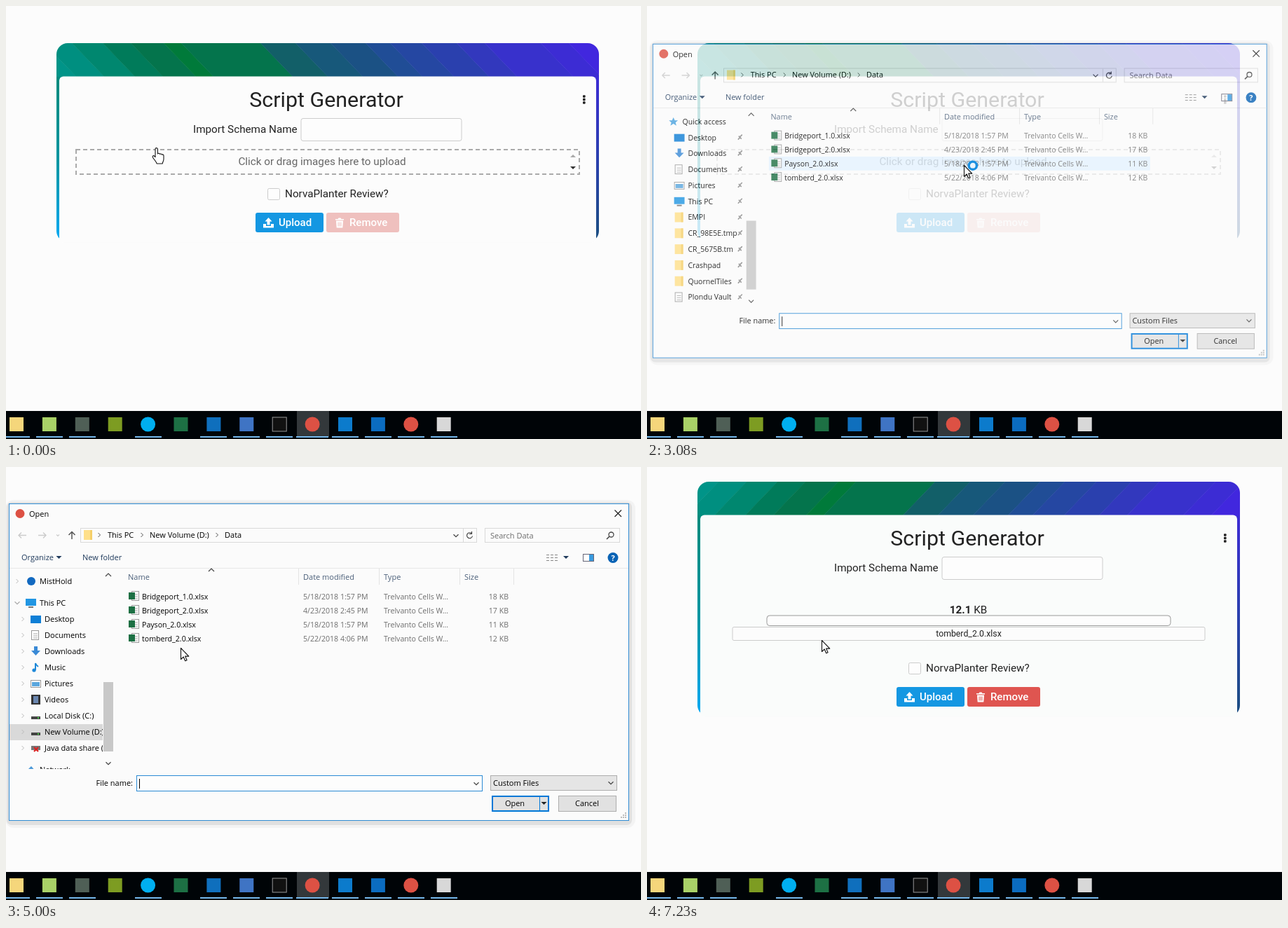
Write an HTML page that moves like this. It is 906 px wide and 618 px high and loops after 8090 ms.

```html
<!DOCTYPE html>
<html lang="en">
<head>
<meta charset="utf-8">
<title>Script Generator</title>
<style>
html, body { margin: 0; width: 100%; height: 100%; overflow: hidden; background: #fcfcfc; }
svg { display: block; }
text { white-space: pre; }
.page { font: 15.25px Roboto, sans-serif; fill: #222; }
.dialog { font: 11px "Open Sans", "Noto Sans", sans-serif; fill: #000; }
.rows { font-size: 10.6px; }
.mid { text-anchor: middle; }
.end { text-anchor: end; }
</style>
</head>
<body>
<svg id="stage" width="906" height="618" viewBox="0 0 906 618"></svg>
<script>
const LOOP = 8090, TICK = 73;
const FILE = 'tomberd_2.0.xlsx';

const rect = (x, y, w, h, fill, more = '') =>
  `<rect x="${x}" y="${y}" width="${w}" height="${h}" fill="${fill}" ${more}/>`;
const box = (x, y, w, h, stroke, fill = 'none', more = '') =>
  rect(x + .5, y + .5, w, h, fill, `stroke="${stroke}" ${more}`);
const disc = (x, y, r, fill, more = '') => `<circle cx="${x}" cy="${y}" r="${r}" fill="${fill}" ${more}/>`;
const text = (x, y, s, more = '') => `<text x="${x}" y="${y}" ${more}>${s}</text>`;
const line = (d, stroke, width = 1) => `<path d="${d}" fill="none" stroke="${stroke}" stroke-width="${width}"/>`;
const shape = (d, fill, more = '') => `<path d="${d}" fill="${fill}" ${more}/>`;
const group = (id, body, more = '') => `<g id="${id}" ${more}>${body}</g>`;
const shift = (dy, body) => `<g transform="translate(0 ${dy})">${body}</g>`;
const chevron = (x, y, stroke = '#444', r = 3.5) => line(`M${x - r} ${y - r / 2}l${r} ${r} ${r} ${-r}`, stroke, 1.2);
const chevronUp = (x, y) => line(`M${x - 4} ${y + 2}l4-4 4 4`, '#444', 1.2);
const chevronRight = (x, y, stroke = '#555') => line(`M${x - 1.5} ${y - 3}l3 3-3 3`, stroke);
const triangle = (x, y, fill, dir = 1) => shape(`M${x - 4} ${y - 2 * dir}h8l-4 ${4 * dir}z`, fill);
const fade = (id, stops) => `<linearGradient id="${id}" x2="0" y2="1">${
  stops.map((c, i) => `<stop offset="${i / (stops.length - 1)}" stop-color="${c}"/>`).join('')}</linearGradient>`;

// Web page -------------------------------------------------------------

const STRIPES = [[-60, '#009488'], [66, '#008f80'], [106, '#00876f'], [150, '#007b5a'], [190, '#04744c'],
  [237, '#007a3a'], [262, '#04744c'], [375, '#125f68'], [425, '#17587a'], [475, '#1b5184'], [525, '#204d96'],
  [560, '#2547a2'], [605, '#2a40ae'], [655, '#3238bd'], [695, '#3831cc'], [775, '#3c2cd4'], [815, '#4127de'], [960]];

function card(id, top, bottom, lean, fill) {
  const stripes = STRIPES.slice(0, -1).map(([x, color], i) => {
    const end = STRIPES[i + 1][0] + .5, from = lean < 0 ? 48 : 0;
    return shape(`M${x + from - 12} ${top}H${end + from - 12}l${lean} 50H${x + from - 12 + lean}z`, color);
  }).join('');
  return `<clipPath id="${id}Clip"><rect x="72" y="${top}" width="774" height="${bottom - top}" rx="16"/></clipPath>
    <g clip-path="url(#${id}Clip)">${stripes}
    ${rect(72, top + 48, 5, bottom - top - 48, 'url(#leftEdge)')}
    ${rect(841, top + 48, 5, bottom - top - 48, 'url(#rightEdge)')}</g>
    ${rect(76, top + 47.5, 766, bottom - top - 47, fill, 'rx="6"')}`;
}

const header = text(457, 144, 'Script Generator', 'class="mid" font-size="30.4"') +
  [129, 133.5, 138].map(y => rect(823, y - 1.8, 3.6, 3.6, '#222', 'rx="1"')).join('') +
  text(267, 181, 'Import Schema Name') + box(420.5, 160, 229, 32, '#ccc', '#fdfdfd', 'rx="3"');

const dropZone = rect(100, 205, 718, 35, 'none', 'stroke="#aaa" stroke-width="2" stroke-dasharray="6 4"') +
  text(451, 227, 'Click or drag images here to upload', 'class="mid" fill="#666"') +
  triangle(809, 214, '#aaa', -1) + triangle(809, 231, '#333');

const fileInfo = text(458.5, 209, '<tspan font-weight="700">12.1</tspan> KB', 'class="mid"') +
  '<rect id="bar" y="212" height="14.5" rx="4" fill="#fdfdfd" stroke="#999"/>' +
  box(121.5, 228, 674, 19, '#ccc', '#fcfcfc', 'rx="2"') +
  text(459, 242, FILE, 'class="mid" font-size="12.3"');

const controls = removeColor => box(373, 260, 17, 16, '#ccc', '#fdfdfd', 'rx="2"') +
  text(398, 273, 'NorvaPlanter Review?') +
  rect(356, 295, 97, 28, '#1497e2', 'rx="3"') + rect(457, 295, 104, 28, removeColor, 'rx="3"') +
  `<g fill="#fff" font-weight="500" font-size="15">${text(389, 314, 'Upload')}${text(490, 314, 'Remove')}</g>` +
  shape('M374.5 302l5 5.5h-3v5h-4v-5h-3zM367 311h4v3h7v-3h4v5.5h-15z', '#fff') +
  shape('M470 304h3.5l1-1.5h3l1 1.5h3.5v1.5h-12zM471 306.5h10l-.7 10h-8.6z', '#fff') +
  line('M474 308.5v6M476 308.5v6M478 308.5v6', removeColor, .9);

const pages =
  group('emptyPage', card('empty', 53, 337, 48, '#fcfcfc') + header + dropZone + controls('#efc0be'), 'class="page"') +
  group('loadedPage', card('loaded', 21, 356, -48, '#fafcfb') + shift(-32, header) + fileInfo +
    shift(19, controls('#df5550')), 'class="page"');

// File dialog ----------------------------------------------------------

const folder = (x, y) => rect(x, y, 12, 14, '#ffe08a') + rect(x + 9, y, 3, 14, '#f5cf68');
const sheet = (x, y) => box(x, y, 10, 13, '#999', '#fff') + line(`M${x + 3} ${y + 5}h6m-6 3h6m-6 3h6`, '#aaa');
const screen = (x, y) => rect(x, y, 15, 10, '#2196e3') + rect(x + 4, y + 11, 7, 2, '#777');
const icons = {
  cloud: (x, y) => disc(x + 8, y, 6, '#1269c0'),
  star: (x, y) => shape(`M${x + 7} ${y - 6}l2 4.5h4.5l-3.5 3 1.3 4.5-4.3-2.7-4.3 2.7 1.3-4.5-3.5-3h4.5z`, '#4aa3df'),
  pc: (x, y) => screen(x, y - 6),
  desktop: (x, y) => rect(x, y - 5, 15, 11, '#0f7fd6'),
  page: (x, y) => sheet(x + 1, y - 7),
  folder: (x, y) => folder(x + 1, y - 7),
  down: (x, y) => shape(`M${x + 5} ${y - 7}h5v6h4l-6.5 7-6.5-7h4z`, '#3a8ad6'),
  note: (x, y) => disc(x + 5, y + 4, 2.6, '#1e88d8') + line(`M${x + 7} ${y + 4}v-10q1 3 4 5`, '#1e88d8', 2),
  picture: (x, y) => box(x, y - 5, 14, 10, '#999', '#fff') + rect(x + 2, y - 2, 11, 6, '#5aa6dd'),
  film: (x, y) => rect(x + 1, y - 7, 13, 14, '#333') + rect(x + 4, y - 5, 7, 10, '#6a86b0'),
  disk: (x, y) => rect(x + 1, y + 1, 13, 4, '#444') + rect(x + 10, y + 2, 2, 2, '#4bd04b'),
  share: (x, y) => rect(x + 1, y - 3, 13, 6, '#777') + line(`M${x + 5} ${y - 1}l6 6m0-6l-6 6`, '#d22', 2.2),
  net: (x, y) => shape(`M${x} ${y + 3}l8-8 7 8z`, '#4a98d8')
};

const quickItems = [['Quick access', 'star'], ['Desktop', 'desktop'], ['Downloads', 'down'], ['Documents', 'page'],
  ['Pictures', 'picture'], ['This PC', 'pc'], ['EMPI', 'folder'], ['CR_98E5E.tmp', 'folder'], ['CR_5675B.tm', 'folder'],
  ['Crashpad', 'folder'], ['QuornelTiles', 'folder'], ['Plondu Vault', 'page']];
const treeItems = [['Desktop', 'desktop'], ['Documents', 'page'], ['Downloads', 'down'], ['Music', 'note'],
  ['Pictures', 'picture'], ['Videos', 'film'], ['Local Disk (C:)', 'disk'], ['New Volume (D:)', 'disk'],
  ['Java data share (', 'share']];

const entry = (x, y, [label, icon]) => icons[icon](x - 20, y) + text(x, y + 4, label);
const quickList = quickItems.map((item, i) => entry(i ? 55 : 47, 164 + 23 * i, item) +
  (i ? line(`M127 ${167 + 23 * i}l3-3m-2-2l4 4m-2-3l3-3`, '#888', 1.6) : '')).join('');
const treeList = rect(5, 367, 134, 23, '#d9d9d9') + entry(48, 163, ['MistHold', 'cloud']) +
  entry(48, 194, ['This PC', 'pc']) + treeItems.map((item, i) => entry(55, 217 + 23 * i, item)).join('') +
  entry(48, 432, ['Network', 'net']);
const expanders = chevronRight(16, 163, '#bbb') + chevron(16, 194, '#aaa') +
  treeItems.map((_, i) => chevronRight(24, 217 + 23 * i, '#bbb')).join('');

const files = [['Bridgeport_1.0.xlsx', '5/18/2018 1:57 PM', 18], ['Bridgeport_2.0.xlsx', '4/23/2018 2:45 PM', 17],
  ['Payson_2.0.xlsx', '5/18/2018 1:57 PM', 11], [FILE, '5/22/2018 4:06 PM', 12]];
const fileRows = files.map(([name, date, size], i) => {
  const y = 188.5 + 20 * i;
  return sheet(179, y - 11.5) + rect(175, y - 9.5, 9, 10, '#1d7044') + text(194, y, name) +
    `<g fill="#6d6d6d">${text(424, y, date)}${text(539, y, 'Trelvanto Cells W...')}${text(717, y, size + ' KB', 'class="end"')}</g>`;
}).join('');

const shadow = rect(-1, 47, 899, 468, '#000', 'rx="12" opacity=".035"') + rect(1, 50, 892, 461, '#000', 'rx="7" opacity=".08"');
const arrowLeft = 'M29 97.5H18m4-4l-4 4 4 4', arrowRight = 'M46 97.5h11m-4-4l4 4-4 4';
const dialog = shadow +
  box(4, 52, 884, 452, '#2f8bd3', '#fbfbfb') +
  disc(20, 66.5, 6.5, '#dd5144', 'id="appIcon"') + text(33, 71, 'Open', 'id="caption"') +
  line('M868.5 61.5l9.5 9.5m0-9.5l-9.5 9.5', '#222', 1.2) +
  line(arrowLeft + arrowRight, '#ccc', 1.4) + chevron(74, 97.5, '#ccc', 2) +
  line('M94 103V92.5m-4.5 4.5l4.5-4.5 4.5 4.5', '#555', 1.5) +
  box(106, 87, 565, 20, '#d9d9d9') + line('M652.5 88v19', '#d9d9d9') + folder(111, 90) +
  [133, 194, 301].map(x => chevronRight(x, 97)).join('') +
  text(145, 101, 'This PC') + text(205, 101, 'New Volume (D:)') + text(312, 101, 'Data') + chevron(642, 98) +
  line('M664.5 95a4 4 0 1 0 1 3.5m-1-6.5v3.5h-3.5', '#444', 1.2) +
  box(683, 87, 192, 20, '#d9d9d9') + text(691, 101.5, 'Search Data', 'fill="#6d6d6d"') +
  disc(863.5, 96.5, 3.5, 'none', 'stroke="#444" stroke-width="1.3"') + line('M861 99l-4 4', '#444', 1.6) +
  `<g fill="#1e395b">${text(22, 133, 'Organize')}${text(109, 133, 'New folder')}</g>` +
  triangle(75.5, 129, '#1e395b') + triangle(799, 129, '#1e395b') +
  line('M771 125.5h4m2 0h4m2 0h4m-16 4h4m2 0h4m2 0h4m-16 4h4m2 0h4m2 0h4', '#888') +
  box(823, 124, 15, 10, '#667', '#fff') + rect(832, 125, 6, 9, '#3a9be0') +
  disc(866, 129.5, 7.5, '#0a63b5') + text(866, 133.5, '?', 'class="mid" fill="#fff" font-weight="700"') +
  line('M5 144.5H888', '#e8e8e8') + line('M417.5 145v23M532.5 145v23M647.5 145v23M724.5 145v23', '#e3e3e3') +
  `<g fill="#4c607a">${text(174, 161, 'Name')}${text(424, 161, 'Date modified')}${text(539, 161, 'Type')}${text(654, 161, 'Size')}</g>` +
  chevronUp(293, 147) +
  '<clipPath id="paneClip"><rect x="5" y="146" width="133" height="285"/></clipPath>' +
  `<g clip-path="url(#paneClip)">${group('quick', quickList, 'class="rows"')}${group('tree', treeList)}${group('expand', expanders)}</g>` +
  rect(139, 307, 14, 99, '#c8c8c8') + chevronUp(146, 154) + chevron(146, 423) +
  '<rect id="row" x="171.5" width="549" height="20"/>' + `<g class="rows">${fileRows}</g>` +
  text(181, 455, 'File name:', 'class="end"') + box(186, 440, 493, 22, '#2a8ad4', '#fdfdfd') + chevron(671, 452) +
  rect(190, 445, 1, 14, '#000', 'id="caret"') + text(190, 456, FILE, 'id="chosen" font-size="10.6"') +
  box(691, 440, 180, 21, '#adadad', '#e5e5e5') + text(695, 455, 'Custom Files') + chevron(863, 451) +
  rect(694, 470, 80, 21, '#e1e1e1', 'stroke="#0078d7" stroke-width="2"') + line('M761.5 471v19', '#0078d7') +
  triangle(767.5, 480, '#222') + text(726, 484, 'Open', 'class="mid"') +
  box(788, 469, 82, 22, '#adadad', '#e1e1e1') + text(829, 484, 'Cancel', 'class="mid"') +
  [[0, 0], [-3, 0], [-6, 0], [0, -3], [-3, -3], [0, -6]].map(([x, y]) => rect(883 + x, 499 + y, 2, 2, '#bbb')).join('');

// Taskbar --------------------------------------------------------------

const apps = ['#f5d67b', '#a9d267', '#4f5f56', '#7d9c22', 'o#00aff0', '#1d7044', '#0f6fbd', '#3f74c4', '#111',
  'o#dd5144', '#0c7bcc', '#0b6cc0', 'o#dd5144', '#d8d8d8'];
const taskbar = rect(0, 578, 906, 40, '#000407') + rect(415, 578, 46, 37, '#33383b') + apps.map((app, i) => {
  const x = 15 + 46.9 * i, width = i === 9 ? 46 : 38;
  const icon = app[0] === 'o' ? disc(x, 597, 10.5, app.slice(1))
    : rect(x - 10, 587, 20, 20, app, i === 8 ? 'stroke="#999"' : '');
  return icon + (i === 3 || i === 5 ? '' : rect(Math.round(x - width / 2), 614, width, 2, '#76b9ed'));
}).join('');

// Pointer --------------------------------------------------------------

const ink = 'stroke="#111" stroke-width="1.1" stroke-linejoin="round"';
const pointer = group('arrow', shape('M.5 .5V16.5L4.2 13 6.7 18.8 9.1 17.8 6.7 12.1H11.8Z', '#fff', ink)) +
  group('hand', shape('M4.5 1.8c0-2.2 3.4-2.2 3.4 0V8.5c.6-1.2 2.9-.9 3.1.5.7-1 2.8-.6 2.9.8.9-.8 2.6-.2 2.6 1.4V16c0 3-1.6 4-1.8 6.5H6.6C6.3 20 3 17 1 13.7-.3 11.6 2 10.3 3.3 11.8L4.5 13.2Z',
    '#fff', ink + ' transform="translate(-6.5 .5)"')) +
  group('busy', disc(12.8, .7, 5.6, '#eaf5fd', 'stroke="#1a8fe0" stroke-width="3.4"'));

// Pointer stops: time, x, y
const ROUTE = [[0, 215, 202], [60, 214, 202], [439, 214, 202], [514, 182, 188], [600, 165, 142], [740, 240, 85],
  [880, 345, 57], [960, 400, 110], [1040, 440, 180], [1175, 446, 233], [1260, 470, 222], [1340, 511, 226],
  [1480, 440, 225], [1550, 392, 207], [1680, 453, 227], [2770, 452, 227], [3839, 452, 227], [3840, 424, 284],
  [3913, 365, 290], [3990, 330, 252], [4130, 250, 168], [4280, 158, 200], [4360, 110, 175], [4500, 80, 200],
  [4640, 100, 290], [4780, 149, 280], [4930, 249, 258], [5004, 249, 258], [5150, 249, 250], [5299, 249, 250],
  [5300, 249, 247], [LOOP, 249, 247]];

function pointerAt(t) {
  const i = Math.max(1, ROUTE.findIndex(stop => stop[0] >= t));
  const [t0, x0, y0] = ROUTE[i - 1], [t1, x1, y1] = ROUTE[i], p = (t - t0) / (t1 - t0);
  return [x0 + (x1 - x0) * p, y0 + (y1 - y0) * p].map(Math.round);
}

// Scene and playback ---------------------------------------------------

document.getElementById('stage').innerHTML =
  `<defs>${fade('leftEdge', ['#008a7c', '#0095a0', '#03a9f4'])}${fade('rightEdge', ['#3c2cd4', '#2a40ae', '#1b4f80'])}</defs>` +
  pages + group('dialog', dialog, 'class="dialog"') + taskbar + group('pointer', pointer);

const ui = {};
document.querySelectorAll('[id]').forEach(el => ui[el.id] = el);
const show = (el, on) => el.setAttribute('visibility', on ? 'inherit' : 'hidden');
const clamp = v => Math.min(1, Math.max(0, v));
const between = (t, a, b) => t >= a && t < b;
const STARTS = [6060, 3840, 2920, 2770, 440, 60, 0];

function stepped(t) {
  const start = STARTS.find(s => s <= t);
  return start + Math.floor((t - start) / TICK) * TICK;
}

function draw(t) {
  const q = stepped(t);
  const [x, y] = pointerAt(q);
  const loaded = q >= 6400;
  ui.emptyPage.style.display = loaded ? 'none' : '';
  ui.loadedPage.style.display = loaded ? '' : 'none';
  const p = clamp((q - 6400) / 760), half = 337 - 49 * p * p * (3 - 2 * p);
  ui.bar.setAttribute('x', 459 - half);
  ui.bar.setAttribute('width', 2 * half);

  const opening = clamp((q - 2920) / 219), closing = clamp((q - 6060) / 290);
  const scale = .972 + .028 * opening - .03 * closing;
  ui.dialog.style.display = t >= 2920 && closing < 1 ? '' : 'none';
  ui.dialog.setAttribute('opacity', (.4 + .6 * opening) * (1 - closing));
  ui.dialog.setAttribute('transform', `translate(430 252) scale(${scale}) translate(-430 -252)`);
  show(ui.appIcon, t < 6060);
  ui.caption.setAttribute('x', t < 6060 ? 33 : 12.5);
  show(ui.quick, t < 3840);
  show(ui.tree, t >= 3840);
  ui.expand.setAttribute('opacity', clamp((q - 4280) / 250) * clamp((5150 - q) / 200));

  const selected = t >= 5900, hovered = Math.floor((y - 175) / 20);
  const row = selected ? 3 : hovered;
  show(ui.row, selected || (between(x, 172, 721) && between(row, 0, 4)));
  ui.row.setAttribute('y', 174.5 + 20 * row + (selected ? .5 : 0));
  ui.row.setAttribute('fill', selected ? '#cce8ff' : '#e5f3ff');
  ui.row.setAttribute('stroke', selected ? '#99d1ff' : 'none');
  show(ui.chosen, selected);
  show(ui.caret, t < 3450 || between(t, 3920, 4430) || between(t, 4940, 5440));

  const hand = t < 2770 && between(x, 99, 819) && between(y, 201, 241);
  show(ui.hand, hand);
  show(ui.arrow, !hand);
  show(ui.busy, between(t, 2770, 3986));
  ui.pointer.setAttribute('transform', `translate(${x} ${y})`);
}

const began = performance.now();
function loop() {
  draw((performance.now() - began) % LOOP);
  requestAnimationFrame(loop);
}
loop();
</script>
</body>
</html>
```
